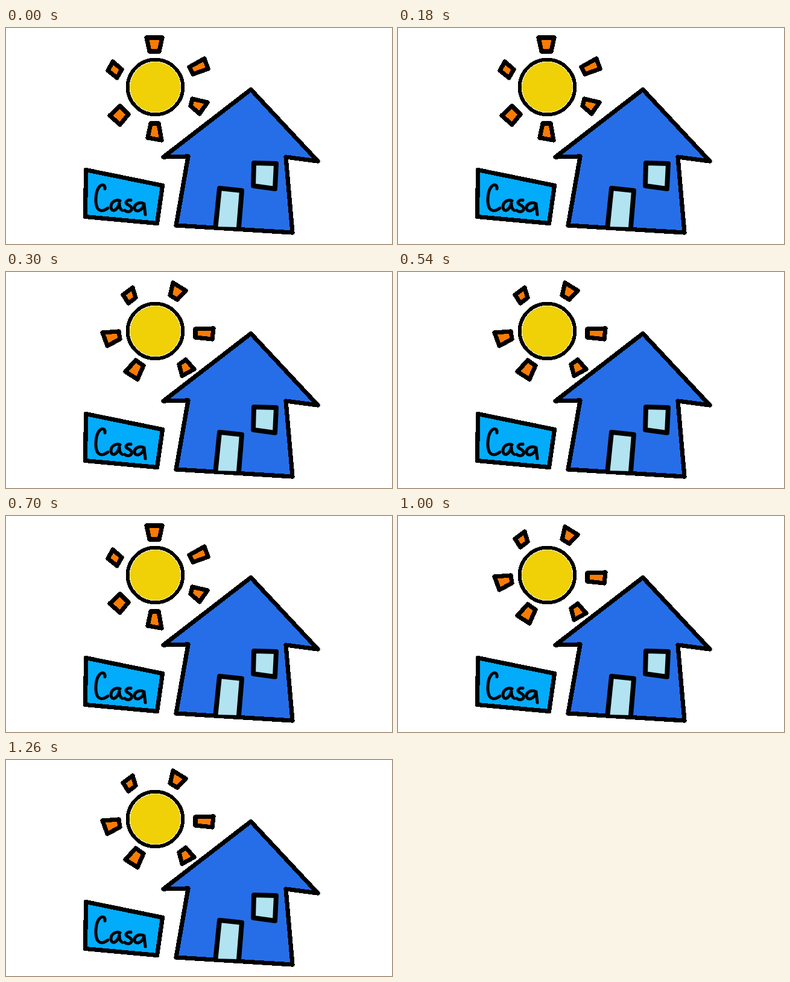
An HTML page for the animation above (1.43 s loop, 640 by 360 pixels).

```html
<!DOCTYPE html>
<html lang="es">
<head>
<meta charset="utf-8">
<title>Casa</title>
<style>
  html, body { margin: 0; width: 100%; height: 100%; overflow: hidden; background: #fff; }
  svg { display: block; width: 100%; height: 100%; }
  .ink { stroke: #000; stroke-width: 7.2; stroke-linejoin: round; stroke-linecap: round; }
  .openings { stroke-width: 8; }
  .lettering { stroke-width: 5; fill: none; }
</style>
</head>
<body>
<svg viewBox="0 0 640 360">
  <g class="ink">
    <g fill="#f97b04" shape-rendering="crispEdges">
      <path id="raysUpright" d="
        M233 16L259 16 254 39 238 39Z
        M304 65L329 51 335 68 310 77Z
        M309 118L334 124 321 143 306 130Z
        M240 159L253 159 258 187 235 183Z
        M189 130L203 144 189 161 172 146Z
        M177 56L192 69 184 83 169 71Z"/>
      <path id="raysTurned" d="
        M210 26L215 43 203 52 194 38Z
        M277 18L298 31 284 46 272 39Z
        M314 95L344 94 342 112 314 109Z
        M298 146L312 162 292 173 287 154Z
        M215 147L228 156 218 179 198 166Z
        M160 101L187 99 189 112 168 123Z"/>
    </g>
    <circle cx="247.5" cy="98.5" r="45.8" fill="#fff" style="stroke-width:6" shape-rendering="crispEdges"/>
    <circle cx="247.5" cy="98.5" r="42" fill="#f0d006" stroke="none"/>
    <path fill="#266ee7" shape-rendering="crispEdges" d="M406 102.5L517 222 464 215 475 341 282 329 302 214 261 215Z"/>
    <g class="openings" fill="#b2e3f0">
      <path d="M411 225L448 226 446 268 410 263Z"/>
      <path d="M347.5 331L354 267 391 271 386 332"/>
    </g>
    <path fill="#03abfb" shape-rendering="crispEdges" d="M132.5 236.5L259.5 262.5 250.5 325.5 131.5 314.5Z"/>
    <g class="lettering" role="img" aria-label="Casa">
      <path d="M164 268C165 259 157 260 153 267C148 276 148 292 151 299C155 307 163 305 169 300"/>
      <path d="M189 288C183 285 175 289 174 297C174 308 184 306 188 292Q188 302 193 304"/>
      <path d="M207 287C201 286 197 290 200 293C205 296 210 298 208 303C205 308 199 306 197 304"/>
      <path d="M229 293C222 289 213 293 213 300C214 308 225 306 229 294L231 311"/>
    </g>
  </g>
</svg>
<script>
  const LOOP = 1430;
  const upright = document.getElementById("raysUpright");
  const turned = document.getElementById("raysTurned");
  const start = performance.now();

  function draw() {
    const t = (performance.now() - start) % LOOP;
    const isUpright = t < 300 || (t >= 700 && t < 1000);
    upright.style.display = isUpright ? "" : "none";
    turned.style.display = isUpright ? "none" : "";
    requestAnimationFrame(draw);
  }
  draw();
</script>
</body>
</html>
```
